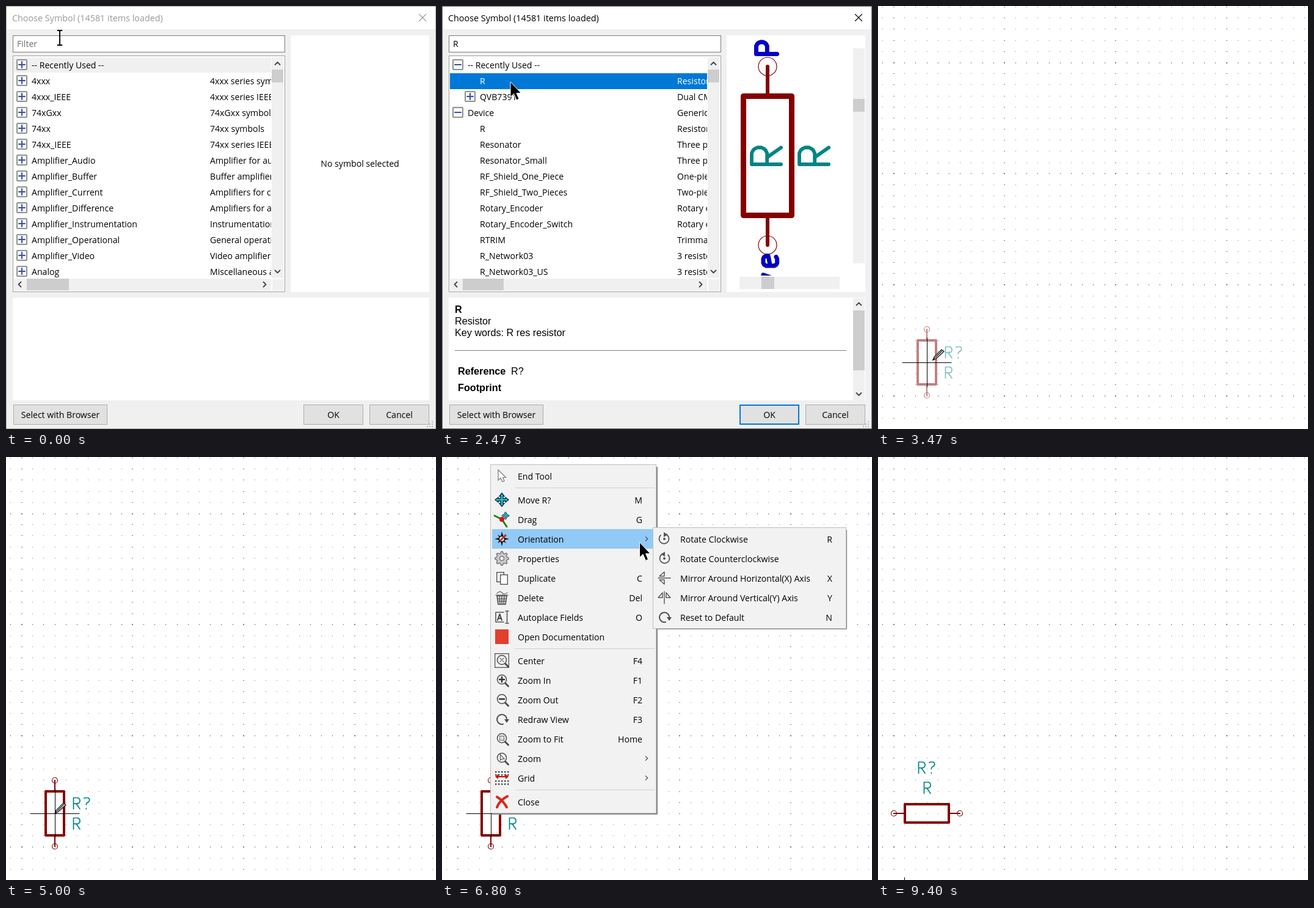
Write an HTML page that moves like this. It is 704x692 px and loops after 9870 ms.

```html
<!DOCTYPE html>
<html lang="en">
<head>
<meta charset="utf-8">
<title>Placing a resistor</title>
<style>
html, body { margin: 0; width: 100%; height: 100%; overflow: hidden; background: #fff; }
svg { display: block; width: 704px; height: 692px; }
text { font: 14.1px "Open Sans", sans-serif; white-space: pre; }
.caption { font-size: 14.35px; }
.info text { font: 16.2px "Liberation Sans", Arial, sans-serif; }
.info .b { font-weight: bold; }
.line { fill: none; stroke-linecap: round; stroke-linejoin: round; }
.icon { fill: none; stroke: #4d4d4d; stroke-width: 1.5; }
</style>
</head>
<body>
<svg id="stage" viewBox="0 0 704 692" xmlns="http://www.w3.org/2000/svg"></svg>
<script>
const LOOP = 9870, CELL = 18.18, GRID_X = 25.6, GRID_Y = 92.5;
// Stroke letters, capitals 21 units high
const P = 'M0 21V0H8L10 1L11 2L12 4V7L11 9L10 10L8 11H0';
const R = P + 'M5 11L12 21';
const QUERY = 'M20 1L22 0H27L29 1L30 3V5L29 7L28 8L26 9L25 10L24 12V13M24 20V21';
const E = 'M9 13L7 14H3L1 13L0 11V3L1 1L3 0H7L9 1L10 3V5L0 7';
const V = 'M0 0L5 14L10 0';

// Drawing helpers
const box = (x, y, w, h, fill, line, lw = 1, extra = '') => {
  const d = line ? lw / 2 : 0;
  return `<rect x="${x + d}" y="${y + d}" width="${w - 2 * d}" height="${h - 2 * d}" fill="${fill}" ${
    line ? `stroke="${line}" stroke-width="${lw}"` : ''} ${extra}/>`;
};
const text = (x, y, s, extra = '') => `<text x="${x}" y="${y}" ${extra}>${s}</text>`;
const path = (d, stroke, w, extra = '') =>
  `<path class="line" d="${d}" stroke="${stroke}" stroke-width="${w}" ${extra}/>`;
const ring = (x, y, r, extra = '') => `<circle cx="${x}" cy="${y}" r="${r}" ${extra}/>`;
const group = (id, body, extra = '') => `<g id="${id}" ${extra}>${body}</g>`;
const chevron = (x, y, turn, size = 4) => path(`M${-size} ${size / 2}L0 ${-size / 2}L${size} ${size / 2}`,
  '#444', size > 3.5 ? 1.8 : 1.1, `transform="translate(${x} ${y}) rotate(${turn})"`);
const clip = (id, x, y, w, h) => `<clipPath id="${id}">${box(x, y, w, h, '#000')}</clipPath>`;

// Symbol chooser
function toggle(x, y, plus) {
  return box(x - 9, y - 9, 18, 18, '#f7f8fa', '#919191', 2, 'rx="1"') +
    path(`M${x - 5} ${y}h10` + (plus ? `M${x} ${y - 5}v10` : ''), '#34539a', 2);
}
function row([name, about, depth = 0, sign = '', style = ''], i, aboutX) {
  const y = 96 + 26 * i, x = 42 + 20 * depth;
  return `<g id="row${aboutX}-${i}">` + (sign ? toggle(x - 16, y, sign === '+') : '') +
    text(x, y + 6, name, style) + text(aboutX, y + 6, about) + '</g>';
}
const allLibraries = [
  ['-- Recently Used --', ''], ['4xxx', '4xxx series symbols'], ['4xxx_IEEE', '4xxx series IEEE symbols'],
  ['74xGxx', '74xGxx symbols'], ['74xx', '74xx symbols'], ['74xx_IEEE', '74xx series IEEE symbols'],
  ['Amplifier_Audio', 'Amplifier for audio'], ['Amplifier_Buffer', 'Buffer amplifiers'],
  ['Amplifier_Current', 'Amplifiers for current'], ['Amplifier_Difference', 'Amplifiers for a difference'],
  ['Amplifier_Instrumentation', 'Instrumentation amplifiers'], ['Amplifier_Operational', 'General operational'],
  ['Amplifier_Video', 'Video amplifiers'], ['Analog', 'Miscellaneous analog']
].map(([name, about]) => [name, about, 0, '+']);
const matches = [
  ['-- Recently Used --', '', 0, '-'], ['R', 'Resistor', 1],
  ['QVB7391', 'Dual CMOS amplifier', 1, '+', 'font-style="italic"'],
  ['Device', 'Generic symbols', 0, '-'], ['R', 'Resistor', 1], ['Resonator', 'Three pin', 1],
  ['Resonator_Small', 'Three pin', 1], ['RF_Shield_One_Piece', 'One-piece', 1],
  ['RF_Shield_Two_Pieces', 'Two-piece', 1], ['Rotary_Encoder', 'Rotary encoder', 1],
  ['Rotary_Encoder_Switch', 'Rotary encoder', 1], ['RTRIM', 'Trimmable resistor', 1],
  ['R_Network03', '3 resistor network', 1], ['R_Network03_US', '3 resistor network', 1]
];
const tree = (rows, aboutX) =>
  rows.map((r, i) => row(r, i, aboutX)).join('');

function preview() {
  const red = '#840000', teal = '#008484', blue = '#0000c0';
  const letter = (d, x, y, scale, color, w) =>
    path(d, color, w / scale, `transform="translate(${x} ${y}) rotate(-90) scale(${scale})"`);
  const name = (d, x, y) => letter(d, x, y, 2.29, teal, 5.8);
  const pinName = (d, x, y) => letter(d, x, y, 1.62, blue, 7);
  const pin = y => ring(533, y, 15, `fill="none" stroke="${red}" stroke-width="1.2"`);
  return `<g clip-path="url(#view)">` + box(489, 143, 88, 204, 'none', red, 9, 'stroke-linejoin="round"') +
    path('M533 99V144M533 346V391', red, 6) + pin(99) + pin(391) +
    name(R, 507, 259) + name(R, 585, 259) +
    pinName(P, 514.5, 78.5) + pinName(E, 526, 425) + pinName(V, 526, 456) + '</g>' +
    box(673, 69, 19, 352, '#f0f0f0') + box(673, 152, 19, 21, '#cdcdcd') +
    box(487, 443, 164, 20, '#f0f0f0') + box(523, 443, 21, 20, '#cdcdcd');
}
function details() {
  return `<g class="info" clip-path="url(#notes)">` + text(21, 502, 'R', 'class="b"') +
    text(21, 521, 'Resistor') + text(21, 540, 'Key words: R res resistor') +
    box(21, 563, 641, 1, '#808080') + text(26, 603, 'Reference', 'class="b"') + text(113, 603, 'R?') +
    text(26, 630, 'Footprint', 'class="b"') + text(26, 657, 'Datasheet', 'class="b"') + '</g>' +
    box(673, 478, 19, 167, '#f0f0f0') + box(673, 498, 19, 98, '#cdcdcd') +
    chevron(682.5, 487.5, 0) + chevron(682.5, 635, 180);
}
const button = (x, w, label) => box(x, 652, w, 33, '#e1e1e1', '#adadad') +
  text(x + w / 2, 674, label, 'text-anchor="middle"');

function dialog() {
  let grip = '';
  for (let i = 0; i < 3; i++) for (let j = 0; j <= i; j++) grip += box(697 - 4 * j, 679 + 4 * i, 2, 2, '#b5b5b5');
  return group('frame', box(0, 0, 704, 692, '#f0f0f0', 'currentColor')) + box(1, 1, 702, 37, '#fff') +
    group('caption', text(10, 25, 'Choose Symbol (14581 items loaded)', 'class="caption"') +
      path('M676.5 13.5l11 11m0-11l-11 11', 'currentColor', 1.1), 'fill="currentColor"') +
    group('field', box(11, 48, 446, 28, '#fff', 'currentColor')) +
    text(18, 67, 'Filter', 'id="hint" fill="#6d6d6d"') + text(18, 67, 'R', 'id="typed"') +
    box(18, 51, 1, 20, '#000', '', 1, 'id="caret"') +
    box(11, 81, 446, 387, '#fff', '#a0a0a0') +
    `<g clip-path="url(#list)">` +
    group('before', box(13, 84, 422, 25, '#f0f0f0') + tree(allLibraries, 334)) +
    group('after', box(13, 110, 422, 26, '#f0f0f0', '', 1, 'id="chosen"') + tree(matches, 385)) + '</g>' +
    box(435, 84, 19, 361, '#f0f0f0') + box(435, 104, 19, 21, '#cdcdcd') +
    chevron(444.5, 94, 0) + chevron(444.5, 434.5, 180) +
    box(13, 446, 421, 20, '#f0f0f0') + box(436, 447, 19, 19, '#f0f0f0') +
    box(34, 446, 69, 19, '#cdcdcd', '', 1, 'id="thumb"') +
    chevron(22.5, 455.5, -90) + chevron(423.5, 455.5, 90) +
    box(466, 48, 227, 420, '#fff') + box(11, 477, 682, 168, '#fff') +
    group('empty', text(579.5, 263, 'No symbol selected', 'text-anchor="middle"')) +
    group('shown', preview() + details()) +
    button(12, 154, 'Select with Browser') + button(487, 98, 'OK') + button(595, 98, 'Cancel') +
    box(487, 652, 98, 33, 'none', '#0078d7', 2, 'id="focus"') + grip;
}

// Schematic canvas: every tenth row and column has thicker dots
function gridPath() {
  const span = (c, i) => i % 10 ? [Math.floor(c), 1] : [Math.round(c) - 1, 2];
  let d = '';
  for (let i = -1; i < 38; i++) for (let j = -5; j < 34; j++) {
    const [x, w] = span(GRID_X + i * CELL, i), [y, h] = span(GRID_Y + j * CELL, j);
    d += `M${x} ${y}h${w}v${h}h${-w}z`;
  }
  return d;
}
function resistor() {
  const end = y => ring(0, y, 4.5, 'stroke-width="1.1"');
  return group('body', box(-17, -38, 34, 76, 'none', 'currentColor', 4, 'stroke-linejoin="round"') +
      path('M0 -54V-38M0 38V54', 'currentColor', 2) + end(-54) + end(54), 'fill="none" stroke="currentColor"') +
    group('labels', path(R + QUERY, 'currentColor', 2, 'id="ref"') + path(R, 'currentColor', 2, 'id="val"'));
}

// Context menu
const lens = inner => ring(0, -1, 7.5) + path('M5.5 5l5 5', '#4d4d4d', 3) + inner;
const cross4 = s => `<g transform="${s}"><path d="M0 -11L4 -6H2V-2H6V-4L11 0L6 4V2H2V6H4L0 11L-4 6H-2V2H-6V4L-11 0L-6 -4V-2H-2V-6H-4Z" fill="#18c5da" stroke="#123" stroke-width="1.3"/></g>`;
const turnArrow = path('M2 8A8 8 0 1 1 8 1', '#4d4d4d', 2) + '<path d="M4 0h8l-4 6z" fill="#4d4d4d" stroke="none"/>';
const gear = () => {
  let d = '';
  for (let i = 0; i < 32; i++) {
    const a = (i - .5) * Math.PI / 16, r = i % 4 < 2 ? 11.3 : 8.5;
    d += `${i ? 'L' : 'M'}${(r * Math.cos(a)).toFixed(1)} ${(r * Math.sin(a)).toFixed(1)}`;
  }
  return `<path d="${d}Z" fill="#c9c9c9" stroke="#777"/>` + ring(0, 0, 3.5, 'fill="#f2f2f2" stroke="#777"');
};
const gridIcon = () => {
  let s = '';
  for (let i = 0; i < 5; i++) for (const y of [-10, -5, 5, 10]) s += box(i * 5 - 11, y - 1, 2.4, 2.4, '#444', '', 1, 'stroke="none"');
  return s + path('M-8 -2H8', '#d40000', 2) + '<path d="M-11 -2l5-4v8zM11 -2l-5-4v8z" fill="#d40000" stroke="none"/>';
};
const entries = [
  [31, 'End Tool', '', '<path d="M-6 -10V7L-2 3.5L1 9.5L4 8L1.5 2.5H6.5Z" fill="#fff" stroke="#777" stroke-width="1.2"/>'],
  [70, 'Move R?', 'M', cross4('')],
  [102, 'Drag', 'G', path('M-12 -6L0 0L8 12', '#148a14', 3) + ring(0, 0, 4, 'fill="#e01010" stroke="none"') + cross4('translate(6 -6) scale(.58)')],
  [134, 'Orientation', '>', '<path d="M0 -12L2.5 -4L7 -7L4 -2L12 0L4 2L7 7L2 4L0 12L-2 4L-7 7L-4 2L-12 0L-4 -2L-7 -7L-2 -4Z" fill="#111" stroke="none"/>' + ring(0, 0, 4.5, 'fill="#fff" stroke="#111"') + path('M-2 2L6 -6', '#d82010', 3)],
  [166, 'Properties', '>', gear()],
  [198, 'Duplicate', 'C', box(-9, -10, 13, 17, '#f4f4f4', '#555', 1.4) + box(-3, -6, 13, 17, '#fff', '#555', 1.4)],
  [230, 'Delete', 'Del', path('M-10 -4H10M-8 -7Q-3 -12 0 -8T9 -8', '#777', 1.5) + '<path d="M-8 -3H8L6 11H-6Z" fill="#ddd" stroke="#444"/>' + path('M-4 -2L-3 10M0 -2V10M4 -2L3 10M-7 2H7M-6 6H6', '#444', 1.2)],
  [262, 'Autoplace Fields', 'O', path('M3 -8H-10V8H3M6 -10H11M6 10H11M8.5 -10V10', '#555', 1.6) + path('M-7 5L-3.5 -5L0 5M-6 2H-1', '#444', 2)],
  [294, 'Open Documentation', '', box(-11, -12, 22, 24, '#e2402f', '', 1, 'stroke="none"')],
  [333, 'Center', 'F4', box(-12, -12, 24, 24, 'none', '#555', 1.3) + lens(path('M-3 -4L3 2M3 -4L-3 2', '#666', 1.1))],
  [365, 'Zoom In', 'F1', lens(path('M-4 -1H4M0 -5V3', '#333', 2.4))],
  [397, 'Zoom Out', 'F2', lens(path('M-4 -1H4', '#333', 2.4))],
  [429, 'Redraw View', 'F3', turnArrow],
  [461, 'Zoom to Fit', 'Home', lens(box(-4, -5, 8, 8, '#ddd', '#666', 1))],
  [493, 'Zoom', '>', lens('<path d="M-2.5 -6V3L0 1L4 1Z" fill="#fff" stroke-width="1.1"/>')],
  [525, 'Grid', '>', gridIcon()],
  [564, 'Close', '', path('M-8 -8Q2 -2 8 9M9 -9Q-4 -2 -8 9', '#d8281c', 4)]
];
const turnIcon = path('M-6 -6A8 8 0 1 0 5 -6', '#555', 1.8) +
  '<path d="M-1 -11L6 -7L-1 -3Z" fill="#555" stroke="none"/>' + ring(0, 0, 2, 'fill="#555" stroke="none"');
const mirrorIcon = turn => `<g transform="rotate(${turn})">` +
  path('M-10 0H10M-8 -3L0 -10V-3ZM-8 3L0 10V3Z', '#555', 1.4) + '</g>';
const orientEntries = [
  ['Rotate Clockwise', 'R', turnIcon],
  ['Rotate Counterclockwise', '', `<g transform="scale(-1 1)">${turnIcon}</g>`],
  ['Mirror Around Horizontal(X) Axis', 'X', mirrorIcon(0)],
  ['Mirror Around Vertical(Y) Axis', 'Y', mirrorIcon(90)],
  ['Reset to Default', 'N', turnArrow]
];
const entry = (left, right, y, name, key, art) =>
  `<g class="icon" transform="translate(${left} ${y})">${art}</g>` + text(left + 26, y + 6, name) +
  (key === '>' ? chevron(right + 7, y, 90, 3.4) : text(right, y + 6, key, 'text-anchor="end"'));
const shadow = (x, right, y, bottom) =>
  path(`M${right + 1} ${y + 5}V${bottom + 1}H${x + 4}`, '#8a8a8a', 2.2);

function menu() {
  return shadow(79, 351, 12, 583) + box(79, 12, 272, 571, '#f2f2f2', '#bdbdbd') +
    box(82, 0, 266, 32, '#91c9f7', '', 1, 'id="hover"') +
    [50, 313, 544].map(y => box(120, y, 228, 1, '#d2d2d2')).join('') +
    entries.map(([y, ...rest]) => entry(98, 328, y, ...rest)).join('');
}
function submenu() {
  const lit = box(348, 118, 311, 32, '#91c9f7');
  return group('subframe', shadow(348, 661, 115, 280)) +
    group('subback', box(345, 115, 317, 166, '#f2f2f2', '#bdbdbd') + group('sublit', lit) +
      orientEntries.map((e, i) => entry(364, 639, 134 + 32 * i, ...e)).join('')) +
    group('picked', lit + entry(364, 639, 134, ...orientEntries[0]));
}

document.getElementById('stage').innerHTML =
  clip('list', 12, 83, 422, 362) + clip('view', 466, 48, 207, 393) + clip('notes', 11, 477, 660, 168) +
  group('dialog', dialog()) +
  group('scene', `<path id="grid" d="${gridPath()}"/>` + group('part', resistor()) +
    path('M-40 .5H40M.5 -40V40', '#000', 1, 'id="cross"')) +
  group('menu', menu()) + group('submenu', submenu()) +
  group('beam', path('M-3.5 -12h2.5l1 1 1-1h2.5M0 -11V11M-3.5 12h2.5l1-1 1 1h2.5', '#000', 1.9)) +
  group('pencil', '<path d="M0 0L2 -5L14 -17L18 -14L5 -2Z" fill="#fff" stroke="#111" stroke-width="1.3"/>' +
    path('M0 0l3-3M4 -4L15 -15', '#111', 1.2)) +
  group('arrow', '<path d="M0 0V25L5.5 19.5L10 30L14 28L10 18.5H17.5Z" stroke="#fff" stroke-width="1"/>');

// Timing tables: [ms, values...]; anchors count grid cells from the final place
const anchorSteps = [[0, 7, -3], [2800, 6, -2], [2870, 4, -1], [2930, 3, 0], [3000, 2, 1], [3130, 1, 1], [3270, 0, 0],
  [8930, 0, 1], [9000, 0, 3], [9070, 0, 6], [9130, 0, 9], [9400, -2, 8]];
const turnSteps = [[0, 0], [3730, 1], [4000, 0], [4270, 2], [4670, 0], [8270, 1]];
const closing = [[2470, 1, 1], [2530, .85, .99], [2600, .5, .977], [2670, .23, .965], [2730, .06, .955], [2800, 0, .95]];
const mousePath = [[70, 88, 52], [470, 86, 57], [1400, 86, 57], [1470, 85, 67], [1600, 86, 74], [1730, 86, 74],
  [2200, 112, 124], [2530, 112, 124]];
const pencilPath = [[2600, 213, 541], [2730, 213, 541], [3000, 122, 605], [3330, 88, 581], [3470, 90, 579],
  [3670, 90, 579], [3730, 80, 583], [8870, 80, 583], [9130, 70, 750]];
const menuPath = [[5400, 80, 583], [5530, 84, 573], [6000, 249, 183], [6200, 257, 164], [6330, 260, 152],
  [6400, 262, 147], [6470, 263, 143], [6600, 263, 143], [7000, 384, 136], [8070, 384, 136], [8130, 80, 583]];

const lastStep = (table, t) => table.filter(s => s[0] <= t).pop() || table[0];
function along(table, t) {
  const i = table.findIndex(s => s[0] >= t);
  if (i < 0) return table[table.length - 1].slice(1);
  if (!i) return table[0].slice(1);
  const a = table[i - 1], b = table[i], k = (t - a[0]) / (b[0] - a[0]);
  return a.slice(1).map((v, n) => v + (b[n + 1] - v) * k);
}

const el = {};
document.querySelectorAll('[id]').forEach(e => el[e.id] = e);
const show = (id, on) => el[id].style.display = on ? '' : 'none';
const move = (id, x, y, more = '') => el[id].setAttribute('transform', `translate(${x} ${y}) ${more}`);
const within = (t, a, b) => t >= a && t < b;
const cellPoint = ([, i, j]) =>
  [Math.floor(GRID_X + (i + 3) * CELL), Math.floor(GRID_Y + (j + 27) * CELL)];

function drawDialog(t) {
  show('dialog', t < 2800);
  const active = within(t, 70, 2530), found = t >= 1470, clicked = t >= 2270;
  el.caption.style.color = active ? '#000' : '#999';
  el.frame.style.color = active ? '#666' : '#aaa';
  el.field.style.color = active && !clicked ? '#0078d7' : '#7a7a7a';
  show('focus', t >= 70);
  show('hint', t < 1200);
  show('typed', t >= 1200);
  show('caret', within(t, 470, 1000) || within(t, 1200, 1800));
  el.caret.setAttribute('x', t < 1200 ? 18 : 27);
  show('before', !found);
  show('empty', !found);
  show('after', found);
  show('shown', found);
  el.thumb.setAttribute('width', found ? 67 : 69);
  el.chosen.setAttribute('fill', clicked ? '#0078d7' : '#f0f0f0');
  el['row385-1'].setAttribute('fill', clicked ? '#fff' : '#000');
  const [, opacity, scale] = lastStep(closing, t);
  el.dialog.style.opacity = opacity;
  el.dialog.style.filter = opacity < 1 ? 'drop-shadow(0 2px 5px #0009)' : '';
  move('dialog', 352 - 1.5 * (1 - scale) / .035, 346 - (1 - scale) / .035, `scale(${scale}) translate(-352 -346)`);
}

function drawScene(t) {
  show('scene', t >= 2600);
  el.grid.setAttribute('fill', t < 2730 ? '#444' : '#808080');
  const moving = t < 5000, turn = lastStep(turnSteps, t)[1];
  move('part', ...cellPoint(lastStep(anchorSteps, Math.min(t, 5000))));
  move('cross', ...cellPoint(lastStep(anchorSteps, t)));
  el.cross.style.display = within(t, 9130, 9400) ? 'none' : '';
  move('body', 0, 0, turn ? 'rotate(90)' : '');
  el.body.style.color = moving ? '#c28080' : '#840000';
  el.labels.style.color = moving ? '#80c2c2' : '#008484';
  const lift = turn === 2 ? -2 : 0;
  move('ref', turn ? -13.5 : 30.5, turn ? -84 + lift : -25.5, 'scale(.87)');
  move('val', turn ? -4.5 : 30.5, turn ? -51 + lift : 7.5, 'scale(.87)');
}

function drawMenu(t) {
  const [x, y] = along(menuPath, t), over = entries.find(e => Math.abs(y - e[0]) <= 16);
  show('menu', within(t, 5400, 8200));
  el.menu.style.opacity = lastStep([[5400, .3], [5470, .7], [5530, 1]], t)[1];
  show('hover', over);
  if (over) el.hover.setAttribute('y', over[0] - 16);
  show('submenu', within(t, 6670, 8400));
  el.submenu.style.opacity = lastStep([[6670, .3], [6730, .7], [6800, 1],
    [8130, .86], [8200, .6], [8270, .35], [8330, .12]], t)[1];
  show('subframe', t < 8200);
  show('subback', t < 8130);
  show('sublit', x >= 348);
  show('picked', t >= 8130);
}

function drawPointers(t) {
  const inMenu = within(t, 5400, 8200), [mx, my] = along(mousePath, t);
  const overList = t < 2530 && my > 78;
  show('beam', t < 2530 && !overList && !within(t, 1200, 1470));
  move('beam', mx, my);
  show('arrow', inMenu || overList);
  move('arrow', ...(inMenu ? along(menuPath, t) : [mx, my]));
  show('pencil', within(t, 2600, 9130) && !inMenu);
  move('pencil', ...along(pencilPath, t));
}

// The picture advances 15 times a second, with times rounded to 10 ms.
function draw(now) {
  const t = Math.round(Math.floor((now % LOOP + 3.4) * .015) * 20 / 3) * 10;
  drawDialog(t);
  drawScene(t);
  drawMenu(t);
  drawPointers(t);
}
const start = performance.now();
function tick() {
  draw(performance.now() - start);
  requestAnimationFrame(tick);
}
tick();
</script>
</body>
</html>
```
